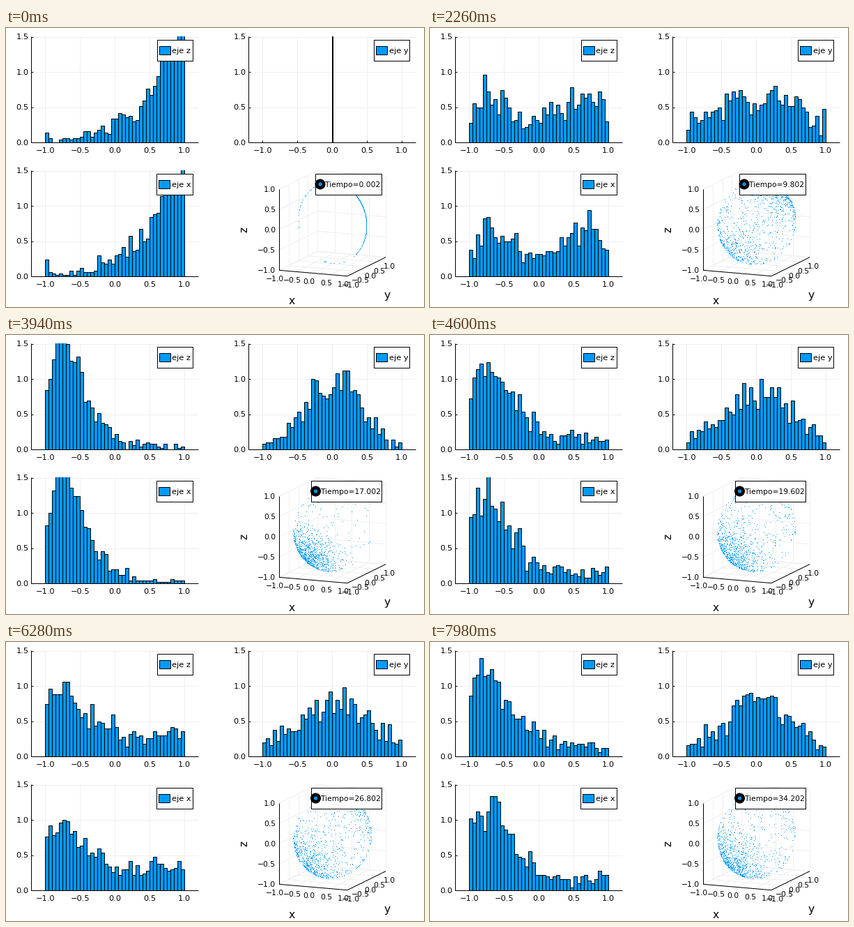
Write a matplotlib script that moves like this. It is 600 px wide and 400 px high and loops after 8 s.

```python
import numpy as np
import matplotlib.pyplot as plt
from matplotlib.animation import FuncAnimation
from matplotlib.collections import LineCollection, PolyCollection
from matplotlib.patches import Circle, Rectangle

W, H, DPI = 600, 400, 100
PT = 72 / DPI
BLUE, GRID = "#009afa", "#efefef"
N, STEPS, DT = 1000, 172, 0.2
TICK_MS, TICKS = 20, 400

plt.rcParams["font.family"] = "DejaVu Sans"
fig = plt.figure(figsize=(W / DPI, H / DPI), dpi=DPI, facecolor="white")
ax = fig.add_axes([0, 0, 1, 1])
ax.set_xlim(0, W)
ax.set_ylim(H, 0)
ax.axis("off")


# ---------- particles on the sphere ----------

# tilt of the potential along the easy axis: (time, strength)
TILT = [(0, 3.3), (4.6, 4.8), (9.8, 0.04), (17, -2.9),
        (22.4, 0.5), (26.8, -0.6), (34.2, -1.3)]


def tilt(t):
    for (t0, b0), (t1, b1) in zip(TILT, TILT[1:]):
        if t <= t1:
            break
    s = np.clip((t - t0) / (t1 - t0), 0, 1)
    return b0 + (b1 - b0) * s * s * (3 - 2 * s)


def simulate():
    rng = np.random.default_rng(12)
    q = rng.random(N)
    side = np.pi * rng.integers(0, 2, N)
    fan = rng.uniform(-1, 1, N)
    fan = np.sign(fan) * np.abs(fan) ** 0.4
    walk = np.zeros(N)
    theta = np.linspace(0, np.pi, 600)
    c, s = np.cos(theta), np.sin(theta)
    states = []
    for i in range(STEPS):
        t = i * DT
        k = min(1.0, (t / 4.6) ** 4.5)
        # polar angle drawn from a double well plus a few strays
        dens = s ** k * np.exp((0.3 + 2.1 * k) * c * c + tilt(t) * c)
        cdf = np.cumsum(dens)
        cdf = 0.96 * (cdf - cdf[0]) / (cdf[-1] - cdf[0]) + 0.02 * (1 - c)
        polar = np.interp(q, cdf, theta)
        phi = side + np.pi / 2 * k * fan + walk
        u, v = np.cos(polar), np.sin(polar)
        r = np.sqrt(0.5)
        states.append((r * (u + v * np.cos(phi)), v * np.sin(phi),
                       r * (u - v * np.cos(phi))))
        q = np.abs((q + rng.normal(0, 0.06, N) + 1) % 2 - 1)
        walk = walk + rng.normal(0, 0.13, N) * k * k
    return states


states = simulate()


# ---------- drawing helpers ----------

def lines(segs, color="black", lw=1.0, z=3):
    ax.add_collection(LineCollection(segs, colors=color, linewidths=lw * PT, zorder=z))


def label(x, y, s, px, ha="center", z=6, **kw):
    return ax.text(x, y, s, fontsize=px * PT, ha=ha, va="center_baseline",
                   zorder=z, **kw)


def box(x0, y0, x1, y1, fill="white", z=5):
    return ax.add_patch(Rectangle((x0, y0), x1 - x0, y1 - y0, facecolor=fill,
                                  edgecolor="black", linewidth=PT, zorder=z))


def num(v):
    return f"{v:.1f}".replace("-", "\u2212")


TENS = (-1, -0.5, 0, 0.5, 1)


class Histogram:
    UX, UY = 99.6, 101

    def __init__(self, x0, top, name, legend):
        self.x0, self.base = x0, top + 152.2
        left, right = x0 - 119.6, x0 + 119.6
        grid, ticks = [], []
        for v in TENS:
            x = x0 + v * self.UX
            grid.append([(x, top), (x, self.base)])
            ticks.append([(x, self.base), (x, self.base - 3)])
            label(x + 0.5, self.base + 11.2, num(v), 11.4)
        for v in (0, 0.5, 1, 1.5):
            y = self.base - v * self.UY
            grid.append([(left, y), (right, y)])
            ticks.append([(left, y), (left + 3, y)])
            label(left - 4, y - 0.3, num(v), 11.4, ha="right")
        lines(grid, GRID, z=1)
        lines(ticks + [[(left, top), (left, self.base)],
                       [(left, self.base), (right, self.base)]])
        self.bars = PolyCollection([], facecolors=BLUE, edgecolors="black",
                                   linewidths=PT, zorder=2)
        ax.add_collection(self.bars)
        clip = Rectangle((left, top - 0.5), 240, 153.5, transform=ax.transData)
        self.bars.set_clip_path(clip)
        lx, rx = legend
        box(lx, top + 5, rx, top + 35)
        box(lx + 3, top + 14, lx + 19, top + 26, BLUE, 6)
        label(lx + 21.5, top + 20.5, name, 11.4, ha="left")

    def update(self, data):
        lo, hi = data.min(), data.max()
        want = max((hi - lo) / 40, 0.01) - 1e-9
        w = next(s for s in (0.01, 0.02, 0.05, 0.1) if s >= want)
        first = int(np.floor(lo / w + 1e-9))
        idx = np.floor(data / w + 1e-9).astype(int) - first
        verts = []
        for j, n in enumerate(np.bincount(idx)):
            if n:
                a = self.x0 + (first + j) * w * self.UX
                b = a + w * self.UX
                y = self.base - min(n / (N * w), 1.7) * self.UY
                verts.append([(a, self.base), (a, y), (b, y), (b, self.base)])
        self.bars.set_verts(verts)


hist_z = Histogram(156, 12, "eje z", (217, 268))
hist_y = Histogram(468, 12, "eje y", (528, 579))
hist_x = Histogram(156, 204, "eje x", (216, 268))


# ---------- 3D panel ----------

def project(x, y, z):
    return 468.5 + 49 * x + 27.5 * y, 280 + 4.2 * x - 13.5 * y - 58 * z


def seg(p, q):
    return [project(*p), project(*q)]


grid = []
for v in TENS:
    grid += [seg((v, -1, -1), (v, 1, -1)), seg((v, 1, -1), (v, 1, 1)),
             seg((-1, v, -1), (1, v, -1)), seg((-1, v, -1), (-1, v, 1)),
             seg((-1, -1, v), (-1, 1, v)), seg((-1, 1, v), (1, 1, v))]
    px, py = project(v, -1, -1)
    label(px - 6, py + 11.5, num(v), 10.8)
    px, py = project(1, v, -1)
    label(px + 5, py + 12.5, num(v), 10.8)
    px, py = project(-1, -1, v)
    label(px - 5, py - 0.5, num(v), 10.8, ha="right")
lines(grid, GRID, z=1)
lines([seg((-1, -1, -1), (1, -1, -1)), seg((1, -1, -1), (1, 1, -1)),
       seg((-1, -1, -1), (-1, -1, 1))])
label(410, 390, "x", 15.5)
label(547, 382, "y", 15.5)
ax.text(342, 289, "z", fontsize=15.5 * PT, ha="center", va="center", rotation=90)

dots, = ax.plot([], [], ",", color=BLUE, zorder=4)
RIGHT = 539
clock_box = box(444, 209, RIGHT, 239)
ring = ax.add_patch(Circle((451, 224), 7.5, color="black", lw=0, zorder=6))
core = ax.add_patch(Circle((451, 224), 2.6, color=BLUE, lw=0, zorder=7))
clock = label(458, 224.5, "", 10.6, ha="left")


def draw(tick):
    # steps are held for 1, 5 and 1 ticks in turn
    cycle, r = divmod(tick, 7)
    step = 3 * cycle + (r > 0) + (r > 5)
    x, y, z = states[step]
    hist_x.update(x)
    hist_y.update(y)
    hist_z.update(z)
    dots.set_data(*project(x, y, z))
    t = 0.002 + DT * step
    left = 444.3 if t < 10 else 437.8
    clock_box.set_x(left)
    clock_box.set_width(RIGHT - left)
    for c in (ring, core):
        c.center = (left + 6.7, 224)
    clock.set_x(left + 14)
    clock.set_text(f"Tiempo={t:.3f}")
    return ()


anim = FuncAnimation(fig, draw, frames=TICKS, interval=TICK_MS,
                     repeat=True, repeat_delay=0, blit=False)
plt.show()
```
